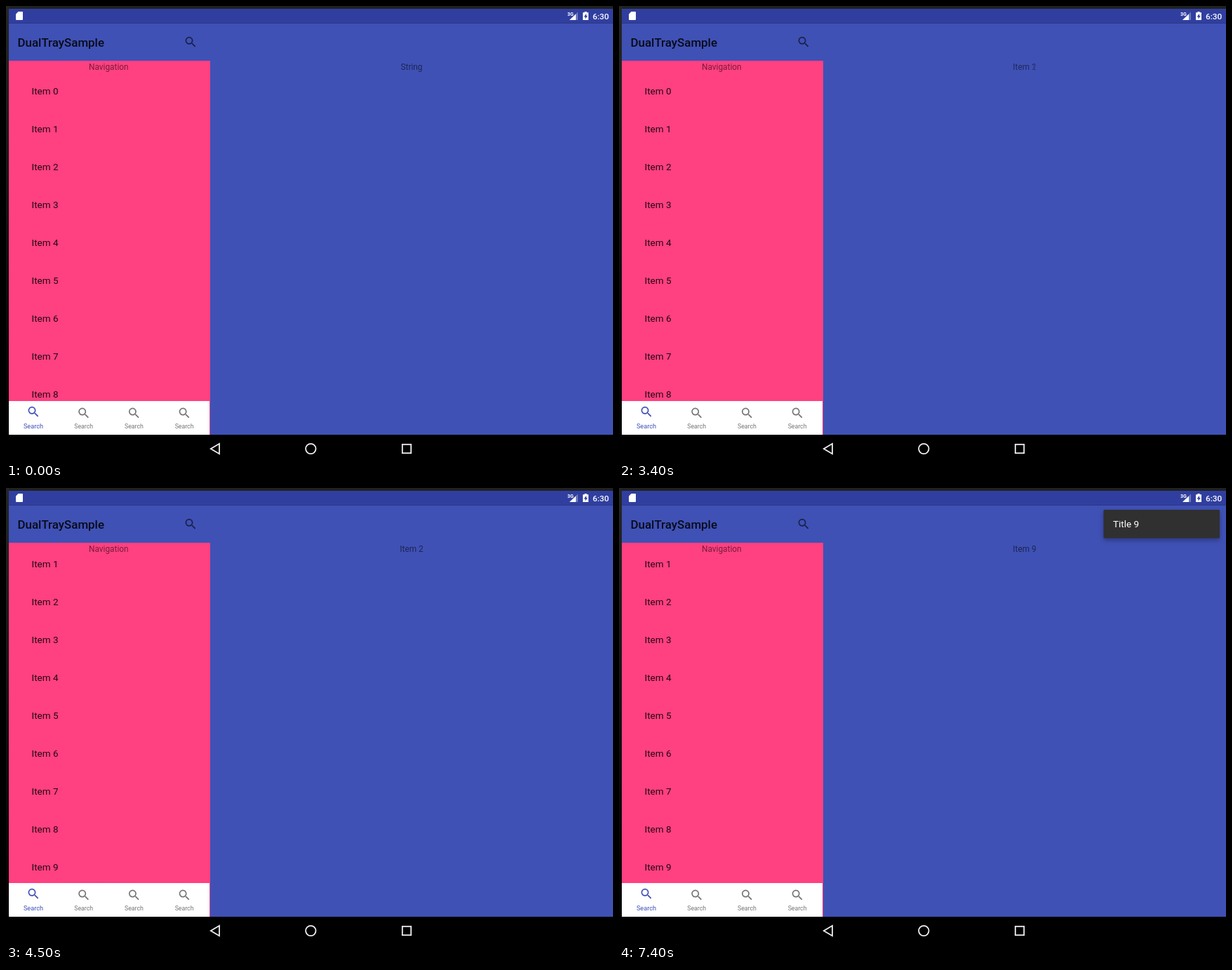
These frames come from a looping animation (865x647 px, 8000 ms). An HTML page:

```html
<!DOCTYPE html>
<html lang="en">
<head>
<meta charset="utf-8">
<title>Two-pane app</title>
<style>
  html, body { margin: 0; width: 100%; height: 100%; overflow: hidden; background: #000; }
  svg { display: block; width: 865px; height: 647px; font-family: Roboto, sans-serif; }
  .small { font-size: 11.85px; fill: rgba(0, 0, 0, .54); text-anchor: middle; }
  .item { font-size: 13.5px; fill: rgba(0, 0, 0, .87); }
  .tab { font-size: 8.75px; fill: #757575; text-anchor: middle; }
  .tab.active { font-size: 9.2px; fill: #3f51b5; }
  .box { filter: drop-shadow(0 3px 3px rgba(0, 0, 0, .3)); }
</style>
</head>
<body>
<svg viewBox="0 0 865 647">
  <defs>
    <linearGradient id="edge" x2="0" y2="1">
      <stop stop-color="#262626"/><stop offset="1" stop-color="#000"/>
    </linearGradient>
    <path id="search" transform="scale(.843)" d="M15.5 14h-.79l-.28-.27A6.47 6.47 0 0 0 16 9.5 6.5 6.5 0 1 0 9.5 16c1.61 0 3.09-.59 4.23-1.57l.27.28v.79l5 4.99L20.49 19l-4.99-5zm-6 0C7 14 5 12 5 9.5S7 5 9.5 5 14 7 14 9.5 12 14 9.5 14z"/>
    <clipPath id="listClip"><rect x="4" y="78" width="287" height="485"/></clipPath>
    <clipPath id="menuClip"><rect id="menuWindow"/></clipPath>
  </defs>

  <rect width="865" height="647"/>
  <rect width="865" height="4" fill="#222"/>
  <rect width="4" height="611" fill="url(#edge)"/>
  <rect x="4" y="4" width="861" height="20.5" fill="#303f9f"/>
  <rect x="4" y="24.5" width="861" height="586.5" fill="#3f51b5"/>

  <g fill="#fff">
    <path d="M17.5 8H23q1 0 1 1v10q0 1-1 1h-8q-1 0-1-1v-7.5z"/>
    <path d="M815 8.500V20h-12z" fill-opacity=".3"/>
    <path d="M812 11.500V20h-9z"/>
    <text x="800" y="14" font-size="7" font-weight="700">3G</text>
    <path d="M824.500 8h3v1.300h2.500V20h-8V9.300h2.500z"/>
    <path d="M827 11l-3.500 4.500h2V18.500l3.300-4.500h-1.800z" fill="#303f9f"/>
    <text x="836" y="18.800" font-size="11.800" font-weight="500">6:30</text>
  </g>

  <text x="16.500" y="58" font-size="16.900" font-weight="500" fill-opacity=".87">DualTraySample</text>
  <use href="#search" x="0" y="0" transform="translate(253 41.300)" fill-opacity=".6"/>
  <g id="dots" fill-opacity=".6">
    <circle cx="840.500" cy="46" r="1.700"/><circle cx="840.500" cy="51.200" r="1.700"/><circle cx="840.500" cy="56.400" r="1.700"/>
  </g>

  <text id="oldLabel" class="small" x="578" y="91"/>
  <text id="newLabel" class="small" x="578" y="91"/>
  <rect id="tint" x="291" y="78" width="574" height="533" fill="#fff"/>

  <rect x="4" y="78" width="287" height="533" fill="#ff4081"/>
  <text class="small" x="146.300" y="91">Navigation</text>
  <g clip-path="url(#listClip)">
    <g id="list"/>
    <circle id="glow" cx="135" r="685" fill="#3f51b5"/>
  </g>
  <rect x="4" y="563" width="286" height="48" fill="#fff"/>
  <g id="tabs"/>

  <g fill="none" stroke="#eee" stroke-width="1.800">
    <path d="M304 623.800v14.400L291.800 631z"/>
    <circle cx="434.300" cy="631" r="7.200"/>
    <rect x="564.800" y="624.800" width="12.400" height="12.400"/>
  </g>

  <g id="menu" clip-path="url(#menuClip)">
    <g id="menuBody">
      <rect class="box" x="690.500" y="31" width="165.500" height="40.500" rx="1" fill="#303030"/>
      <text x="704" y="56.300" font-size="13.500" fill="#fff">Title 9</text>
    </g>
  </g>
</svg>

<script>
const $ = id => document.getElementById(id);
const set = (id, attrs) => {
  for (const name in attrs) $(id).setAttribute(name, attrs[name]);
};
const lerp = (a, b, p) => a + (b - a) * p;
const clamp = v => Math.max(0, Math.min(1, v));

const LOOP = 8000, STEP = 100, ROW = 53.94;

// Detail pane: [start, crossfade steps, label]
const labels = [
  [-STEP, 1, 'String'],
  [500, 4, 'Item 0'],
  [1600, 3, 'Item 1'],
  [3400, 2, 'Item 2'],
  [5500, 2, 'Item 9'],
];

// List overscroll: time -> [height, opacity]
const glows = { 4200: [20, .12], 4300: [35, .2], 4400: [20, .12], 4500: [2, .06], 4600: [2, .06] };

for (let i = 0; i < 10; i++) {
  $('list').innerHTML += `<text class="item" x="36.500" y="${126.3 + i * ROW}">Item ${i}</text>`;
}
for (let i = 0; i < 4; i++) {
  const x = 39 + i * 71.7;
  $('tabs').innerHTML +=
    `<use href="#search" transform="translate(${x - 10} ${i ? 570 : 568.3})" fill="${i ? '#757575' : '#3f51b5'}"/>` +
    `<text class="tab ${i ? '' : 'active'}" x="${x}" y="602.200">Search</text>`;
}

function drawDetail(t) {
  const i = labels.findLastIndex(([start]) => t >= start);
  const [start, steps, text] = labels[i];
  const p = clamp(((t - start) / STEP + 1) / steps);
  $('oldLabel').textContent = i ? labels[i - 1][2] : '';
  $('newLabel').textContent = text;
  set('oldLabel', { opacity: 1 - p });
  set('newLabel', { opacity: p });
  const tinted = (t >= 1600 && t < 3400) || (t >= 5500 && t < 7200);
  set('tint', { opacity: tinted ? .046 : 0 });
}

function drawList(t) {
  const scroll = t < 4100 ? 0 : t < 4200 ? 58.5 : t < 4500 ? 67.5 : 67;
  const [height, opacity] = glows[t] || [0, 0];
  set('list', { transform: `translate(0 ${-scroll})` });
  set('glow', { cy: 563 - height + 685, opacity });
}

function drawMenu(t) {
  const p = t < 7300 ? 0 : t < 7400 ? .75 : 1;
  const left = lerp(759, 690, p);
  set('dots', { opacity: t >= 5300 ? 1 : 0 });
  set('menu', { opacity: t < 7200 ? 0 : lerp(.7, 1, p) });
  set('menuBody', { transform: `translate(${lerp(35, 0, p)} 0)` });
  set('menuWindow', p < 1
    ? { x: left, y: 31, width: 858 - left, height: 40.5 }
    : { x: 680, y: 26, width: 185, height: 56 });
}

function draw() {
  const t = Math.floor(performance.now() % LOOP / STEP) * STEP;
  drawDetail(t);
  drawList(t);
  drawMenu(t);
  requestAnimationFrame(draw);
}
draw();
</script>
</body>
</html>
```
